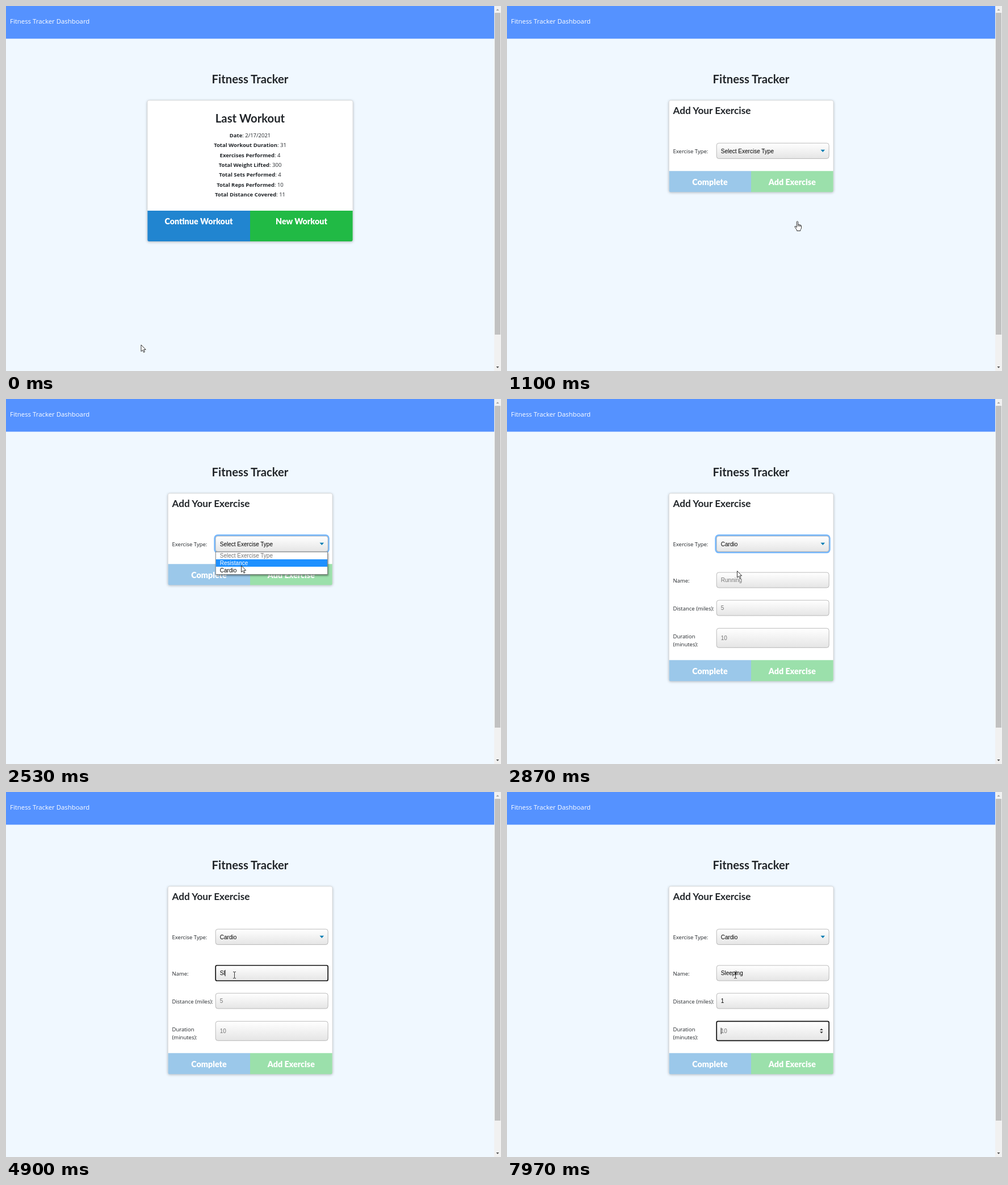
Recreate the animation shown at these times as an HTML page. Size 872 px wide and 642 px high, loop 8 s.

```html
<!DOCTYPE html>
<html lang="en">
<head>
<meta charset="utf-8">
<title>Workout log</title>
<style>
  html, body { margin: 0; width: 100%; height: 100%; overflow: hidden; background: #f0f8ff; }
  svg { display: block; }
  text { font: 9.5px "Open Sans", sans-serif; fill: #212529; white-space: pre; }
  .mid { text-anchor: middle; }
  .bold { font-weight: 700; }
  .brand { font-size: 11.4px; fill: #fff; }
  .title { font: 700 20.3px Lato, sans-serif; }
  .subtitle { font: 700 17.2px Lato, sans-serif; }
  .button { font: 900 14.3px Lato, sans-serif; fill: #fff; }
  .field { font: 10px "Liberation Sans", Arial, sans-serif; fill: #000; }
  .field.hint { fill: #757575; }
  .card { filter: drop-shadow(0 1px 2px rgba(0, 0, 0, .25)); }
  .popup { filter: drop-shadow(1px 2px 1.5px rgba(0, 0, 0, .4)); }
</style>
</head>
<body>
<svg id="stage" width="872" height="642" viewBox="0 0 872 642">
  <defs>
    <linearGradient id="fieldFill" x2="0" y2="1">
      <stop stop-color="#fff"/><stop offset="1" stop-color="#e5e5e5"/>
    </linearGradient>
  </defs>
  <rect width="872" height="642" fill="#f0f8ff"/>
  <rect width="860" height="57.5" fill="#5592ff"/>
  <text class="brand" x="7" y="30.5">Fitness Tracker Dashboard</text>
  <path d="M860 0h12v642h-12z" fill="#f1f1f1"/>
  <path d="M861 12h10v566h-10z" fill="#c1c1c1"/>
  <path d="M863.5 8l2.5-3 2.5 3z" fill="#a3a3a3"/>
  <path d="M863.5 634l2.5 3 2.5-3z" fill="#505050"/>
  <text class="title mid" x="430" y="136">Fitness Tracker</text>

  <g id="summary">
    <rect class="card" x="249" y="166" width="362" height="248" rx="3" fill="#fff" stroke="#d4d4d5" stroke-width=".7"/>
    <text class="title mid" x="430" y="205">Last Workout</text>
    <g id="stats"></g>
    <path d="M249.3 360H430v54H252q-2.7 0-2.7-3z" fill="#2185d0"/>
    <path id="newButton" d="M430 360h180.7v51q0 3-2.7 3H430z"/>
    <text class="button mid" x="339.5" y="384">Continue Workout</text>
    <text class="button mid" x="520.5" y="384">New Workout</text>
  </g>

  <g id="form">
    <rect id="formCard" class="card" x="285.3" y="166" width="289.7" rx="3" fill="#fff" stroke="#d4d4d5" stroke-width=".7"/>
    <text class="subtitle" x="292.5" y="190">Add Your Exercise</text>
    <text x="292.5" y="259.3">Exercise Type:</text>
    <rect id="selectRing" x="367.8" y="239.8" width="200.4" height="30" rx="5" fill="none" stroke="#76b8fd" stroke-width="3"/>
    <rect x="369.2" y="241.2" width="198" height="27.2" rx="4" fill="url(#fieldFill)" stroke="#aaa" stroke-width=".8"/>
    <path d="M552.5 252.7h7.6l-3.8 4.2z" fill="#007cb2"/>
    <text id="selectText" class="field" x="376.8" y="258.5"></text>
    <g id="cardio">
      <text x="292.5" y="323">Name:</text>
      <text x="292.5" y="372">Distance (miles):</text>
      <text x="292.5" y="421">Duration</text>
      <text x="292.5" y="434.7">(minutes):</text>
      <g id="fields"></g>
    </g>
    <g id="actions">
      <path d="M285.6 0H430v37H288q-2.4 0-2.4-3z" fill="#9bc8ea"/>
      <path d="M430 0h144.7v34q0 3-2.4 3H430z" fill="#9be0ab"/>
      <text class="button mid" x="357.5" y="24.3">Complete</text>
      <text class="button mid" x="502.3" y="24.3">Add Exercise</text>
    </g>
    <g id="menu">
      <rect class="popup" x="369.3" y="269" width="197.2" height="39.6" fill="#fff" stroke="#767676" stroke-width=".8"/>
      <rect id="choice" x="369.8" width="196.2" height="13" fill="#1e90ff"/>
      <text class="field hint" x="376.8" y="279">Select Exercise Type</text>
      <text id="option0" class="field" x="376.8" y="292">Resistance</text>
      <text id="option1" class="field" x="376.8" y="305">Cardio</text>
    </g>
  </g>

  <g id="pointer" stroke-linejoin="round">
    <path id="arrow" d="M0 0V11.6L2.7 9.1 4.5 13.2 6.4 12.4 4.6 8.4H8.2z" fill="#fff" stroke="#000" stroke-width=".8"/>
    <path id="hand" d="M-1.2 1Q0-.7 1.2 1V6Q2.4 5.2 3.3 6.4 4.4 5.7 5.3 6.9 6.8 6.7 7 8.2V12Q6.8 14 5.3 15V17H-.8V15.6L-4.3 10.4Q-5 8.7-3.2 8.8L-1.2 11zM1.2 6v3M3.3 6.5V9.4M5.3 7v2.6" fill="#fff" stroke="#000" stroke-width=".8"/>
    <path id="beam" d="M-2.5-5.6H-.6L0-5.1.6-5.6H2.5M0-5.1V5.1M-2.5 5.6H-.6L0 5.1.6 5.6H2.5" fill="none" stroke="#222" stroke-width=".9"/>
  </g>
</svg>
<script>
const LOOP = 8000;
const PAGE = 1030, FOCUS = 1930, OPEN = 2130, PICK = 2870;
const $ = id => document.getElementById(id);
const show = (id, on) => $(id).setAttribute('visibility', on ? 'inherit' : 'hidden');
const set = (id, attrs) => { for (const key in attrs) $(id).setAttribute(key, attrs[key]); };

const stats = [['Date', '2/17/2021'], ['Total Workout Duration', 31], ['Exercises Performed', 4],
  ['Total Weight Lifted', 300], ['Total Sets Performed', 4], ['Total Reps Performed', 10],
  ['Total Distance Covered', 11]];
$('stats').innerHTML = stats.map(([name, value], i) =>
  `<text class="mid" x="430" y="${231 + i * 17.35}"><tspan class="bold">${name}</tspan>: ${value}</text>`).join('');

// Each key is [time, text so far]; a field owns the focus between from and to.
const fields = [
  { y: 305, h: 27, hint: 'Running', from: 3730, to: 6770,
    keys: [4600, 4900, 5100, 5270, 5370, 5470, 6030, 6200].map((t, i) => [t, 'Sleeping'.slice(0, i + 1)]) },
  { y: 354, h: 27, hint: '5', from: 6770, to: 7970, number: true, keys: [[7370, '1']] },
  { y: 403.3, h: 34, hint: '10', from: 7970, to: LOOP, number: true, keys: [] }
];
$('fields').innerHTML = fields.map(({ y, h }, i) => {
  const mid = y + h / 2;
  return `<rect id="box${i}" x="369.2" y="${y}" width="198" height="${h}" fill="url(#fieldFill)"/>
    <text id="value${i}" class="field" x="376.8" y="${mid + 3.6}"></text>
    <path id="caret${i}" d="M0 ${mid - 5.5}v11" stroke="#000" stroke-width=".9"/>
    <path id="spin${i}" d="M551.2 ${mid - 1.2}l2.8-3 2.8 3zM551.2 ${mid + 1.2}l2.8 3 2.8-3z" fill="#333"/>`;
}).join('');

const path = [[30, 238, 596], [300, 467, 484], [500, 467, 484], [800, 511.5, 378.5], [1400, 511.5, 378.5],
  [1730, 442, 263], [1930, 440, 251], [2130, 440, 251], [2530, 414.5, 293], [2730, 405.5, 302.5],
  [3130, 405.5, 302.5], [3230, 402.5, 329], [3430, 402.5, 329], [3500, 402.5, 322]];

function pointerAt(t) {
  const next = path.findIndex(p => p[0] > t);
  if (next === 0) return path[0].slice(1);
  if (next < 0) return path[path.length - 1].slice(1);
  const [t0, x0, y0] = path[next - 1], [t1, x1, y1] = path[next];
  const u = (t - t0) / (t1 - t0), k = u * u * (3 - 2 * u);
  return [x0 + (x1 - x0) * k, y0 + (y1 - y0) * k];
}

function drawField(field, i, t) {
  const focused = t >= field.from && t < field.to;
  const typed = field.keys.filter(key => key[0] <= t).pop();
  const text = $('value' + i);
  text.textContent = typed ? typed[1] : field.hint;
  text.setAttribute('class', typed ? 'field' : 'field hint');
  set('box' + i, { stroke: focused ? '#101010' : '#aaa', 'stroke-width': focused ? 1.7 : .8, rx: focused ? 2.5 : 4 });
  const sinceKey = t - (typed ? typed[0] : field.from);
  show('caret' + i, focused && sinceKey % 1060 < 530);
  const x = 377.2 + (typed ? text.getComputedTextLength() : 0);
  set('caret' + i, { transform: `translate(${x} 0)` });
  show('spin' + i, focused && field.number);
}

function draw(t) {
  const [x, y] = pointerAt(t);
  const onForm = t >= PAGE, expanded = t >= PICK;
  const hand = t > 500 && t < 1400 && y < 414;
  const beam = t >= 3165;

  show('summary', !onForm);
  show('form', onForm);
  set('newButton', { fill: hand ? '#16ab39' : '#21ba45' });

  set('formCard', { height: expanded ? 330 : 161 });
  set('actions', { transform: `translate(0 ${expanded ? 459.3 : 290.3})` });
  $('selectText').textContent = expanded ? 'Cardio' : 'Select Exercise Type';
  show('selectRing', t >= FOCUS && t < fields[0].from);
  show('cardio', expanded);
  if (expanded) fields.forEach((field, i) => drawField(field, i, t));
  else fields.forEach((field, i) => { show('caret' + i, false); show('spin' + i, false); });

  const open = t >= OPEN && t < PICK;
  const row = y < 282 ? -1 : y < 295 ? 0 : 1;
  show('menu', open);
  show('choice', open && row >= 0);
  set('choice', { y: 282 + 13 * Math.max(row, 0) });
  [0, 1].forEach(i => { $('option' + i).style.fill = i === row ? '#fff' : '#000'; });

  set('pointer', { transform: `translate(${x} ${y})` });
  show('hand', hand);
  show('beam', beam);
  show('arrow', !hand && !beam);
}

function tick() {
  draw(performance.now() % LOOP);
  requestAnimationFrame(tick);
}
tick();
</script>
</body>
</html>
```
